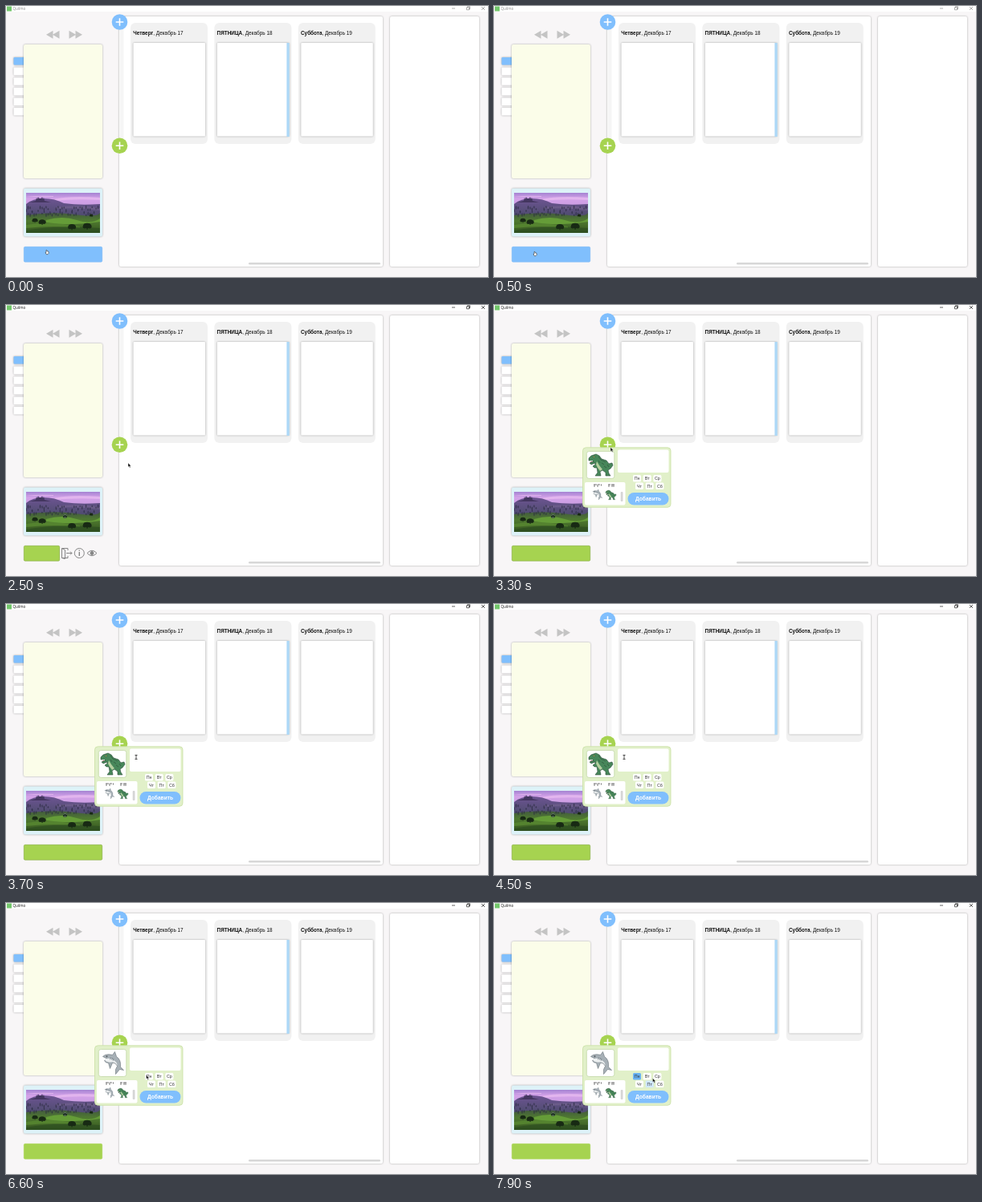
Recreate the animation shown at these times as an HTML page. Size 600x338 px, loop 8 s.

```html
<!DOCTYPE html>
<html lang="ru">
<head>
<meta charset="utf-8">
<title>Планировщик</title>
<style>
  html, body { margin: 0; width: 100%; height: 100%; overflow: hidden; background: #f8f6f7; }
  svg { display: block; width: 100%; height: 100%; }
  text { font-family: "Liberation Sans", Arial, sans-serif; font-size: 6.4px; fill: #111; }
  .panel { filter: drop-shadow(0 .4px .9px #0005); }
  .head tspan, .add { font-weight: bold; }
  .day text { font-size: 5.3px; text-anchor: middle; fill: #333; }
</style>
</head>
<body>
<svg viewBox="0 0 600 338" preserveAspectRatio="none">
  <defs>
    <linearGradient id="sky" x2="0" y2="1">
      <stop stop-color="#a583d2"/><stop offset=".3" stop-color="#d3a2e8"/><stop offset="1" stop-color="#c49add"/>
    </linearGradient>
    <linearGradient id="haze" x2="0" y2="1">
      <stop stop-color="#6d5492"/><stop offset="1" stop-color="#484a68"/>
    </linearGradient>
    <linearGradient id="field" x2="0" y2="1">
      <stop stop-color="#42593f"/><stop offset=".4" stop-color="#4f7a30"/><stop offset="1" stop-color="#35551f"/>
    </linearGradient>
    <clipPath id="photoClip"><path d="M25 233h92v50H25z"/></clipPath>
    <g id="rewind" fill="#c4c4c4"><path d="M0 5L8.500 0V10ZM8 5L16.500 0V10Z"/></g>
    <g id="tree">
      <path d="M-.5 0V4H.6V0Z"/><ellipse rx="4" ry="2.700"/><circle cx="-2.500" cy="1" r="2"/><circle cx="2.600" cy=".8" r="2.100"/>
    </g>
    <g id="dino" stroke="#2c4a38" stroke-width=".6" stroke-linejoin="round">
      <path fill="#a34a4c" stroke="none" d="M3 9H10V12L4 13Z"/>
      <path fill="#47875a" d="M1 6L4 3 10 1 14 3 17 7 23 9 26 13 30 12 31 15 28 19 25 21 26 25 28 28H22L22 24 18 21 15 23 16 28H9L12 24 11 18 8 18 6 16 9 14 9 12 4 14 2 12 7 10 1 9Z"/>
      <path fill="#b5cfa0" stroke="none" d="M11 10L14 15 18 20 15 22 12 18 10 14Z"/>
      <path fill="#fff" stroke="none" d="M2 9l1 2 1-2 1 2 1-2z"/>
      <path fill="none" d="M13 4l3 4 6 3M17 12l3 2M20 16l3 2M24 14l2 3M13 9l2 3"/>
      <circle cx="7.500" cy="4.300" r=".9" fill="#e3d271"/>
    </g>
    <g id="shark" stroke="#69727a" stroke-width=".6" stroke-linejoin="round">
      <path fill="#a7b0b6" d="M2 6Q6 2 14 4L17 0 19 6Q25 10 24 19L28 23 23 22 18 28 18 22 20 18Q18 13 14 14L11 21 9 14Q5 14 4 11L8 9Z"/>
      <path fill="#eef1f2" stroke="none" d="M5 9Q12 7 16 11 20 13 20 17 17 12 12 13 7 13 5 11Z"/>
      <path fill="none" d="M12 7l-1 3m3-2.500-1 3m2.500-2-1 3"/>
      <circle cx="7" cy="5.800" r=".7" fill="#222"/>
    </g>
  </defs>

  <path fill="#f8f6f7" d="M0 0h600v338H0z"/>
  <path fill="#fff" d="M0 0h600v7H0z"/>
  <path fill="#72c66a" d="M1 .5h6v6H1z"/>
  <g id="titleBar">
    <text x="8.500" y="4.900" style="font:4.600px 'Open Sans',sans-serif">Quilmo</text>
    <path fill="none" stroke="#222" stroke-width=".7" d="M555 3h4M573.500 1.800h3v3h-3zM574.500 1.800v-1h3v3h-1M592 1l4 4m0-4-4 4"/>
  </g>

  <use href="#rewind" x="50" y="30.700"/>
  <use href="#rewind" transform="translate(95 30.700)scale(-1 1)"/>
  <g id="tabs"></g>
  <rect class="panel" x="22" y="48" width="98" height="167" rx="2" fill="#fbfde9"/>

  <rect class="panel" x="22" y="227.500" width="98" height="60" rx="2" fill="#ddf2f8"/>
  <g clip-path="url(#photoClip)">
    <path fill="url(#sky)" d="M25 233h92v24H25z"/>
    <path fill="#efc4f3" opacity=".6" d="M60 241q20-5 57-2v3q-30-2-57 1zM25 238q16-2 34-1v1z"/>
    <path fill="url(#haze)" d="M25 247Q33 240 47 240T72 246Q92 249 117 247V266H25Z"/>
    <path fill="#43365f" d="M37 243l1-4 1 2 1-3 1 2h3l1-2 1 3 1-2 1 4 8 2H29Z"/>
    <path fill="#756590" opacity=".6" d="M62 251Q90 247 117 252V255Q90 251 62 253Z"/>
    <path fill="url(#field)" d="M25 261Q58 256 86 260T117 258V283H25Z"/>
    <path fill="#659c38" d="M50 267Q70 261 88 267T117 265V269Q85 275 50 270Z"/>
    <path fill="#5c8d32" opacity=".7" d="M25 273Q55 268 92 275V277Q60 273 25 277Z"/>
    <path fill="#29491f" opacity=".55" d="M25 280Q60 273 117 277V283H25Z"/>
    <g id="cypresses" fill="#2a2b40" opacity=".75"></g>
    <g id="trees" fill="#182a14"></g>
    <g id="photoMark"><circle cx="73.500" cy="263.500" r="2.500" fill="#182b1d"/><path stroke="#b4c4b1" stroke-width=".6" fill="none" d="M71.500 262.500q2-2 4 0M72 265h3"/></g>
  </g>

  <rect id="menuButton" x="22.300" y="300.300" height="18.900" rx="1.500" stroke-width=".6"/>
  <g id="menuIcons" fill="none" stroke="#858585" stroke-width="1">
    <path d="M77 306v-2.500h-7.500v12H77V313M69.500 303.500l4 2v11l-4-1M75 309.500h7m-2-2 2 2-2 2"/>
    <circle cx="91.300" cy="309.500" r="6"/><path stroke-width="1.400" d="M91.300 308v5M91.300 305.500v1.300"/>
    <path d="M101 309.500Q107 303 113 309.500 107 316 101 309.500Z"/><circle cx="107" cy="309.500" r="2" fill="#858585"/>
  </g>

  <rect class="panel" x="141" y="13" width="328" height="312" rx="2" fill="#fff"/>
  <rect class="panel" x="478" y="13" width="111" height="312" rx="2" fill="#fff"/>
  <path fill="#f5f5f5" d="M141.500 21q5 1 5 7v137q0 6-5 7z"/>
  <g id="cards"></g>
  <rect x="302" y="320" width="164" height="2.400" rx="1.200" fill="#d7d7d7"/>
  <g stroke="#fff" stroke-width="1.600">
    <circle cx="141.500" cy="20" r="9.800" fill="#80bffd" stroke="none"/><path d="M136.700 20h9.600m-4.800-4.800v9.600"/>
    <circle cx="141.500" cy="174.300" r="9.800" fill="#a6d350" stroke="none"/><path d="M136.700 174.300h9.600m-4.800-4.800v9.600"/>
  </g>

  <g id="popup">
    <rect x="110.500" y="177.800" width="109.500" height="74.500" rx="4" fill="#e1f0c9" stroke="#c9e0a4" stroke-width=".8"/>
    <rect x="115.300" y="182.500" width="34.500" height="34" rx="3" fill="#fff" stroke="#c3d8a8" stroke-width=".8"/>
    <use id="bigDino" href="#dino" x="117" y="185"/>
    <use id="bigShark" href="#shark" x="118.500" y="185.500"/>
    <rect x="154" y="180.500" width="63.500" height="28.500" rx="2" fill="#fff"/>
    <rect x="113" y="221" width="50.500" height="28.500" rx="2" fill="#fff"/>
    <path stroke="#777" stroke-width="1" fill="none" d="M124 224h4m1 0h3m1.500-.5v2M125 224v3m4-3v3M142 224h3m1 0h4m-7 0v3m4-3v3m2-3v3"/>
    <use href="#shark" transform="translate(122 230)scale(.46)"/>
    <use href="#dino" transform="translate(138.500 230.500)scale(.44)"/>
    <rect x="157.700" y="233" width="2.800" height="12" rx="1" fill="#d5d5d5"/>
    <g id="days"></g>
    <rect x="166.500" y="234" width="51" height="15.500" rx="7.700" fill="#80bffd"/>
    <text class="add" x="192" y="244.300" text-anchor="middle" style="font-size:6.600px;fill:#fff">Добавить</text>
  </g>

  <g id="cursor">
    <path id="arrow" fill="#111" stroke="#fff" stroke-width=".35" d="M0 0V5L1.200 4 2 6 3 5.500 2.200 3.700H3.700Z"/>
    <path id="hand" fill="#fff" stroke="#333" stroke-width=".65" d="M-1-2.500Q0-3 .3-1.300L2-.7 2.200 1.300 1 2.700H-.7L-2 .6-.9.200Z"/>
    <path id="beam" fill="none" stroke="#222" stroke-width=".8" d="M-1.500-2.500h3M0-2.500v5m-1.500 0h3"/>
  </g>
</svg>
<script>
const $ = id => document.getElementById(id);
const fill = (id, items, draw) => { $(id).innerHTML = items.map(draw).join(''); };
const show = (id, on) => $(id).setAttribute('display', on ? 'inline' : 'none');

fill('tabs', [0, 1, 2, 3, 4, 5], i =>
  `<rect class="panel" x="9.500" y="${64 + i * 12.6}" width="16" height="9.600" rx="1" fill="${i ? '#fff' : '#80bffd'}"/>`);

fill('cards', [['Четверг', 17], ['ПЯТНИЦА', 18], ['Суббота', 19]], ([name, date], i) =>
  `<g transform="translate(${155 + i * 104.4} 21)">
    <rect width="96" height="151" rx="6" fill="#f1f1f1"/>
    <text class="head" x="3.200" y="15"><tspan>${name}</tspan>, Декабрь ${date}</text>
    <rect class="panel" x="3.500" y="25" width="89.500" height="116.500" rx="1" fill="#fff"/>
    ${i === 1 ? '<path fill="#acd8f7" d="M90 25h3.300v117H90z"/>' : ''}
  </g>`);

// Small trees scattered over the slopes
fill('cypresses', Array.from({ length: 56 }, (_, i) => i), i => {
  const x = 25 + i * 37.3 % 92, y = 256 + Math.sin(i * 2.3) * 5;
  return `<ellipse cx="${x}" cy="${y}" rx=".7" ry="${1.2 + i % 3 * .6}"/>`;
});
fill('trees', [[36, 267, .8], [45, 269, 1], [82, 275, 1.1], [101, 274, 1.2], [106, 261, .5]], ([x, y, s]) =>
  `<use href="#tree" transform="translate(${x} ${y})scale(${s})"/>`);
fill('days', ['Пн', 'Вт', 'Ср', 'Чт', 'Пт', 'Сб'], (name, i) => {
  const x = 173 + i % 3 * 12.7 + (i > 2 ? 3 : 0), y = i > 2 ? 221.5 : 212;
  return `<g class="day"><rect id="day${i}" x="${x}" y="${y}" width="10" height="8.500" rx="1.500"/>
    <text x="${x + 5}" y="${y + 6.1}">${name}</text></g>`;
});

// Pointer stops: time, x, y
const route = [
  [0, 51, 307], [300, 51, 309], [1700, 51, 309], [2300, 148, 203], [2500, 152, 197],
  [3000, 143, 176], [3200, 143, 176], [3700, 162, 191], [4700, 162, 191],
  [5300, 130.5, 234], [5900, 130.5, 234], [6600, 174.5, 214.5], [7000, 175, 215],
  [7400, 193, 224], [7500, 193, 224], [7800, 206, 238], [7900, 197.5, 218.5], [8000, 197.5, 218.5]
];
function pointerAt(t) {
  const i = Math.max(1, route.findIndex(stop => stop[0] > t));
  const [t0, x0, y0] = route[i - 1], [t1, x1, y1] = route[i];
  const p = (t - t0) / (t1 - t0), ease = p * p * (3 - 2 * p);
  return [x0 + (x1 - x0) * ease, y0 + (y1 - y0) * ease];
}

function render(t) {
  const active = t >= 900, narrow = active && t < 2900, popup = t >= 3100;
  const [x, y] = pointerAt(t);
  $('titleBar').setAttribute('opacity', active ? 1 : .5);
  show('photoMark', active);
  show('menuIcons', narrow);

  const button = $('menuButton');
  const hovered = t < 1900;
  button.setAttribute('width', narrow ? 44.4 : 97.4);
  button.setAttribute('fill', !active ? '#80bffd' : hovered ? '#c5c7c8' : '#a6d350');
  button.setAttribute('stroke', !active ? '#79b7f3' : hovered ? '#929596' : t < 4800 ? '#82a83d' : '#a6d350');

  show('popup', popup);
  show('bigDino', t < 6000);
  show('bigShark', t >= 6000);
  for (let i = 0; i < 6; i++) {
    $('day' + i).setAttribute('fill',
      i === 0 && t >= 7000 ? '#68b1f2' : i === 4 && t >= 7500 ? '#cfe7fc' : '#fff');
  }

  const beam = popup && x > 154 && y < 209;
  show('hand', hovered);
  show('beam', beam);
  show('arrow', !hovered && !beam);
  $('cursor').setAttribute('transform', `translate(${x} ${y})`);
}

function tick() {
  render(Math.floor(performance.now() % 8000 / 100) * 100);
  requestAnimationFrame(tick);
}
tick();
</script>
</body>
</html>
```
